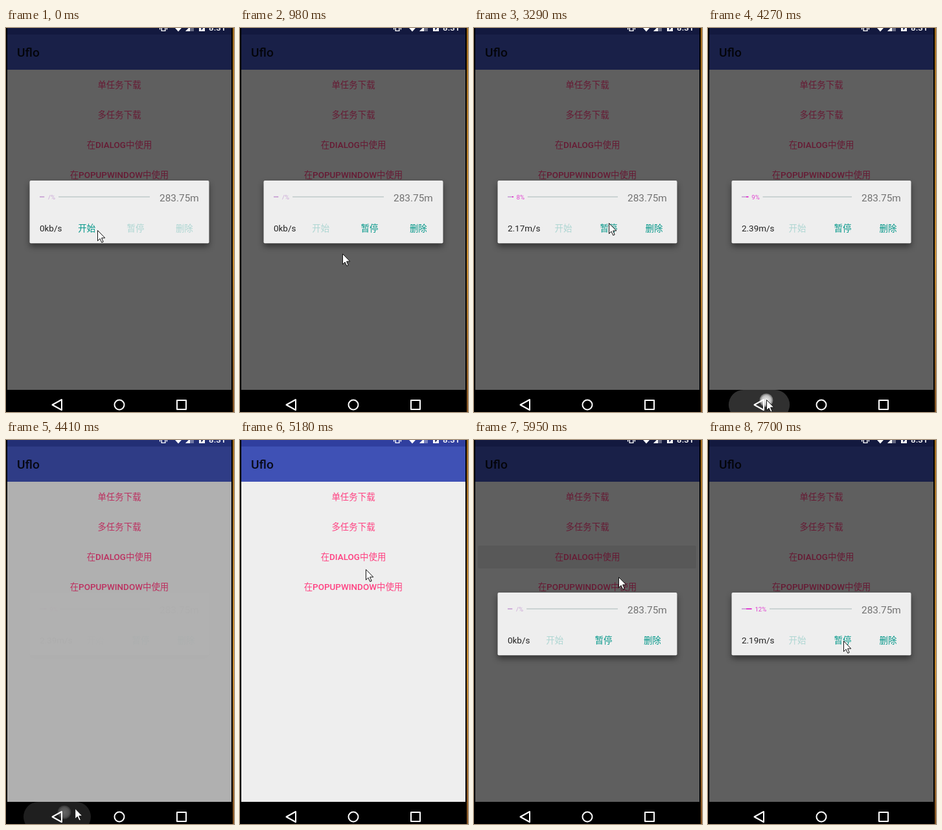
Animation of 352 by 589 pixels, one loop 8000 ms. Source, as an HTML page:

```html
<!DOCTYPE html>
<html lang="zh-CN">
<head>
<meta charset="utf-8">
<style>
  html, body { margin: 0; width: 100%; height: 100%; overflow: hidden; background: #000; }
  svg { display: block; width: 100vw; height: 100vh; }
  text { font: 13.44px Roboto, "Noto Sans CJK SC", "Noto Sans CJK", sans-serif; }
  .medium { font-weight: 500; }
  .menu { fill: #ff4081; text-anchor: middle; }
  .button { fill: #009688; text-anchor: middle; }
  .title { font-size: 19.2px; fill: rgba(0, 0, 0, .87); }
  .size { font-size: 15.4px; fill: #717171; }
  .percent { font-size: 9.6px; }
  .card { fill: #eee; filter: drop-shadow(0 5px 5px rgba(0, 0, 0, .45)); }
</style>
</head>
<body>
<svg viewBox="0 0 352 589">
  <defs>
    <linearGradient id="edge" x2="0" y2="1">
      <stop offset="0" stop-color="#a06a1c"/>
      <stop offset=".6" stop-color="#c88a2c"/>
      <stop offset="1" stop-color="#805020"/>
    </linearGradient>
    <radialGradient id="glow">
      <stop offset="0" stop-color="#fff" stop-opacity=".95"/>
      <stop offset=".7" stop-color="#eee" stop-opacity=".75"/>
      <stop offset="1" stop-color="#bbb" stop-opacity=".4"/>
    </radialGradient>
  </defs>

  <rect width="352" height="589"/>
  <rect x="350" width="2" height="589" fill="url(#edge)"/>
  <rect x="2" width="346" height="10" fill="#303f9f"/>
  <rect x="2" y="10" width="346" height="54" fill="#3f51b5"/>
  <rect x="2" y="64" width="346" height="491" fill="#eee"/>
  <rect id="rowPress" x="6" y="162" width="337" height="35" rx="2"/>
  <text class="title medium" x="17" y="44">Uflo</text>
  <g id="menu"></g>
  <rect id="dim" x="2" width="346" height="555"/>

  <g fill="#fff">
    <path d="M240.2 0V4.4H245.8V0M237.6 0V2.6M248.4 0V2.6" fill="none" stroke="#fff" stroke-width="1.4"/>
    <path d="M261 0H271L266 5.4Z"/>
    <path d="M277 5H290V0H282Z" opacity=".35"/>
    <path d="M277 5H284V0H282Z"/>
    <path d="M298 0H307V5H298Z"/>
    <path d="M304.5 0L301.5 4V1.5H300.5L301.5 0Z" fill="#1a2255"/>
    <text x="313" y="4" class="medium">8:31</text>
  </g>

  <g id="dialog">
    <rect class="card" x="36.5" y="234" width="277" height="96.3" rx="2"/>
    <rect id="buttonPress" x="88" y="292" width="74" height="32" rx="3"/>
    <g stroke-width="1.8">
      <path id="rest" stroke="#cbd3d3"/>
      <path d="M52 259H59" stroke="#cba6d6"/>
      <path id="done" stroke="#e030d0"/>
    </g>
    <text id="percent" class="percent" y="262.5"></text>
    <text class="size" x="237" y="266">283.75m</text>
    <text id="speed" x="52" y="312" fill="#212121"></text>
    <g id="buttons"></g>
  </g>

  <rect id="navPress" y="555" height="46" rx="23" fill="#fff"/>
  <circle id="touch" cx="90" cy="571" r="10.5" fill="url(#glow)"/>
  <g fill="none" stroke="#fff" stroke-width="2" stroke-linejoin="round">
    <path d="M71.5 578L86 570V586Z"/>
    <circle cx="175" cy="578" r="7.5"/>
    <rect x="264" y="571" width="14" height="14"/>
  </g>
  <path id="cursor" d="M.5 .5V16.5L4 13L6.8 19L9.2 18L6.6 12H11.8Z"
        fill="#fff" stroke="#111" stroke-linejoin="round"/>
</svg>
<script>
const LOOP = 8000, STEP = 70;
const START_TAP = 630, BACK_TAP = 4270, ROW_TAP = 5600, REOPEN = 5670;

const $ = id => document.getElementById(id);
const set = (el, attrs) => Object.entries(attrs).forEach(([k, v]) => el.setAttribute(k, v));
const ramp = (t, from, to) => Math.min(1, Math.max(0, (t - from) / (to - from)));
const pulse = (t, peak, rise, fall) => ramp(t, peak - rise, peak) * (1 - ramp(t, peak, peak + fall));
const easeInOut = k => k < .5 ? 4 * k ** 3 : 1 - 4 * (1 - k) ** 3;

function addText(parent, cls, x, y, label) {
  const el = document.createElementNS("http://www.w3.org/2000/svg", "text");
  set(el, { class: cls + " medium", x, y });
  el.textContent = label;
  return parent.appendChild(el);
}

["单任务下载", "多任务下载", "在DIALOG中使用", "在POPUPWINDOW中使用"]
  .forEach((label, i) => addText($("menu"), "menu", 175, 92 + i * 46.1, label));
const buttons = ["开始", "暂停", "删除"].map(label => addText($("buttons"), "button", 0, 312, label));

// Where the pointer comes to rest, and when it arrives.
const stops = [
  { at: 0, x: 141, y: 310 }, { at: 420, x: 114, y: 298 }, { at: 980, x: 158, y: 346 },
  { at: 1540, x: 173, y: 336 }, { at: 2590, x: 201, y: 365 }, { at: 3290, x: 208, y: 299 },
  { at: 3990, x: 90, y: 570 }, { at: 4970, x: 191, y: 252 }, { at: 5320, x: 196, y: 178 },
  { at: 5950, x: 223, y: 210 }, { at: 6860, x: 236, y: 328 }, { at: 7280, x: 243, y: 375 },
  { at: 7700, x: 209, y: 308 }
];

// Longer glides take more time; the vertical part is eased.
function pointer(t) {
  const next = stops.findIndex(stop => stop.at > t);
  if (next < 0) return stops[stops.length - 1];
  const a = stops[next - 1], b = stops[next];
  const duration = 250 + 1.25 * Math.hypot(b.x - a.x, b.y - a.y);
  const k = ramp(t, b.at - duration, b.at);
  return { x: a.x + (b.x - a.x) * k, y: a.y + (b.y - a.y) * easeInOut(k) };
}

// Each download reports one percent more with every new speed.
const downloads = [
  { start: 1820, every: 875, percent: 7, speeds: ["1.54", "2.17", "2.39"] },
  { start: 6230, every: 700, percent: 10, speeds: ["2.06", "2.31", "2.19"] }
];

function progress(t) {
  const { start, every, percent, speeds } = downloads[t < REOPEN ? 0 : 1];
  if (t < start) return { percent: 7, speed: "0kb/s" };
  const i = Math.min(speeds.length - 1, Math.floor((t - start) / every));
  return { percent: percent + i, speed: speeds[i] + "m/s" };
}

function drawDialog(t) {
  const { percent, speed } = progress(t);
  const faint = percent === 7;
  const x = 52 + 1.7 * percent, gap = 4.8;
  const textWidth = percent > 9 ? 17.8 : 12.4;

  set($("done"), { d: `M59 259H${Math.max(59, x - gap)}` });
  set($("rest"), { d: `M${x + textWidth + gap} 259H222` });
  set($("percent"), { x: faint ? 65 : x, fill: faint ? "#cba6d6" : "#e040d0" });
  $("percent").textContent = faint ? "/%" : percent + "%";
  $("speed").textContent = speed;

  // The three buttons share the space right of the speed label.
  const left = speed.length > 5 ? 103 : 87, cell = (313 - left) / 3;
  const canStart = t < START_TAP;
  buttons.forEach((button, i) => set(button, {
    x: left + cell * (i + .5),
    opacity: (i === 0) === canStart ? 1 : .27
  }));
}

function draw(now) {
  const t = Math.floor(now % LOOP / STEP) * STEP;
  drawDialog(t);

  const opening = ramp(t, REOPEN, REOPEN + 210);
  const opacity = {
    dim: .6 * (1 - ramp(t, BACK_TAP, BACK_TAP + 250) + opening),
    dialog: 1 - ramp(t, BACK_TAP, BACK_TAP + 142) + opening,
    buttonPress: .07 * pulse(t, START_TAP, 140, 350),
    rowPress: .11 * pulse(t, ROW_TAP, 140, 900),
    navPress: .19 * pulse(t, BACK_TAP, 140, 400),
    touch: pulse(t, BACK_TAP, 140, 210)
  };
  for (const id in opacity) set($(id), { opacity: opacity[id] });

  const width = 60 + 44 * ramp(t, BACK_TAP - 140, BACK_TAP + 40);
  set($("navPress"), { x: 79 - width / 2, width });

  const { x, y } = pointer(t);
  set($("cursor"), { transform: `translate(${x} ${y})` });
}

const start = performance.now();
function tick() {
  draw(performance.now() - start);
  requestAnimationFrame(tick);
}
tick();
</script>
</body>
</html>
```
